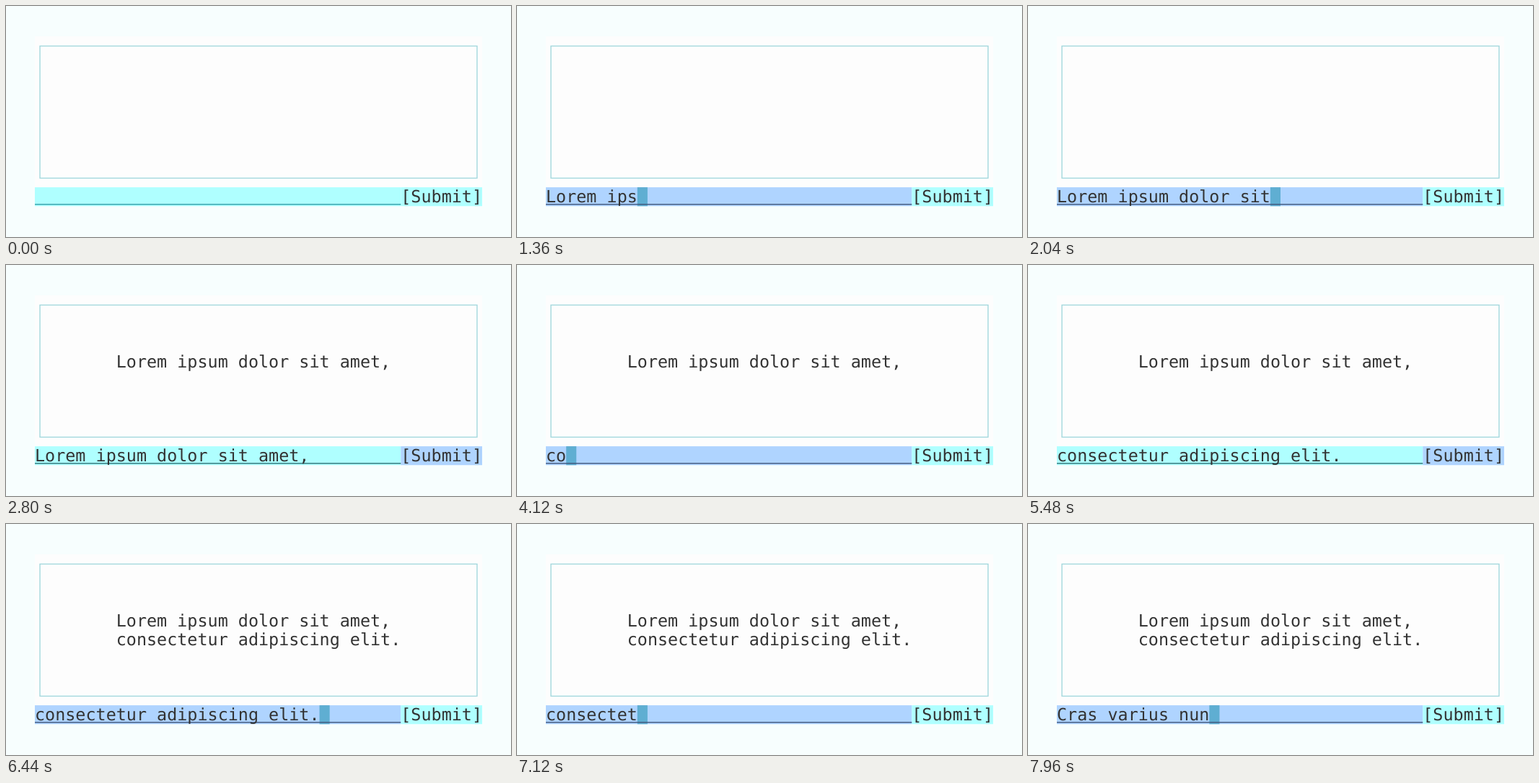
These frames come from a looping animation (700x320 px, 8000 ms). An HTML page:

```html
<!DOCTYPE html>
<html lang="en">
<head>
<meta charset="utf-8">
<title>Terminal form</title>
<style>
html, body { margin: 0; width: 100%; height: 100%; overflow: hidden; background: #f7fefe; }
svg { display: block; width: 700px; height: 320px; }
text {
  font: 23.405px "DejaVu Sans Mono", monospace;
  fill: #333;
  text-rendering: geometricPrecision;
  white-space: pre;
}
</style>
</head>
<body>
<svg id="stage" viewBox="0 0 700 320"></svg>
<script>
const LOOP = 8000, TICK = 40;
const COLS = 44, FIELD = 36, CELL_W = 620 / COLS, CELL_H = 26.14;
const IDLE = '#afffff', FOCUS = '#afd4ff', CURSOR = '#5faed2';
const INPUT_ROW = 8;

const stage = document.getElementById('stage');
const colX = c => 40 + c * CELL_W;
const rowY = r => 42 + r * CELL_H;

function add(tag, attrs) {
  const el = document.createElementNS('http://www.w3.org/2000/svg', tag);
  for (const k in attrs) el.setAttribute(k, attrs[k]);
  return stage.appendChild(el);
}

function cells(col, row, w, h, fill) {
  return add('rect', { x: colX(col), y: rowY(row), width: w * CELL_W, height: h * CELL_H, fill });
}

// One x per character keeps the text on the terminal grid.
function line(col, row, str) {
  const x = Array.from({ length: COLS - col }, (_, i) => colX(col + i).toFixed(2)).join(' ');
  const el = add('text', { x, y: rowY(row) + 21.2 });
  el.textContent = str;
  return el;
}

cells(0, 0, COLS, 9, '#fdfdfd');
add('rect', {
  x: colX(0.5), y: rowY(0.5) + 0.4, width: 43 * CELL_W, height: 7 * CELL_H,
  fill: 'none', stroke: '#a3d8dd', 'stroke-width': 1.4
});
const field = cells(0, INPUT_ROW, FIELD, 1);
const button = cells(FIELD, INPUT_ROW, COLS - FIELD, 1);
const cursor = cells(0, INPUT_ROW, 1, 1, CURSOR);
const rule = add('rect', { x: 40, y: 274.1, width: FIELD * CELL_W, height: 1.4 });
const typed = line(0, INPUT_ROW, '');
line(FIELD, INPUT_ROW, '[Submit]');

const texts = ['Lorem ipsum dolor sit amet,', 'consectetur adipiscing elit.', 'Cras varius nun'];
const output = [
  { at: 2800, el: line(8, 3, texts[0]) },
  { at: 5960, el: line(8, 4, texts[1]) }
];

// Characters erased, then typed, in each tick.
const runs = [
  { at: 1000, erase: '', type: '1111011111' + '0' + '1101201101' + '0' + '11011210111' },
  { at: 3760, erase: '33333433', type: '110' + '111101111' + '0' + '11101111012110111011' + '01' },
  { at: 6920, erase: '33343333', type: '1' + '110111011011' + '110201' }
];

const focusSteps = [
  [0, ''], [1000, 'field'], [2320, 'button'], [3280, 'field'], [5480, 'button'], [6440, 'field']
];

const sum = (digits, n) => [...digits.slice(0, n)].reduce((s, d) => s + +d, 0);

function inputAt(t) {
  const i = runs.findLastIndex(r => t >= r.at);
  if (i < 0) return '';
  const { at, erase, type } = runs[i];
  const n = Math.floor((t - at) / TICK) + 1;
  if (n <= erase.length) {
    const old = texts[i - 1];
    return old.slice(0, old.length - sum(erase, n));
  }
  return texts[i].slice(0, sum(type, n - erase.length));
}

function draw(t) {
  const focus = focusSteps.findLast(s => t >= s[0])[1];
  const inField = focus === 'field';
  const str = inputAt(t);
  if (typed.textContent !== str) typed.textContent = str;
  field.setAttribute('fill', inField ? FOCUS : IDLE);
  button.setAttribute('fill', focus === 'button' ? FOCUS : IDLE);
  cursor.setAttribute('x', colX(str.length));
  cursor.setAttribute('visibility', inField ? 'visible' : 'hidden');
  rule.setAttribute('fill', inField ? '#41587c' : focus ? '#2f7478' : '#33a0aa');
  for (const { at, el } of output) el.setAttribute('visibility', t >= at ? 'visible' : 'hidden');
}

const start = performance.now();
function frame() {
  draw((performance.now() - start) % LOOP);
  requestAnimationFrame(frame);
}
frame();
</script>
</body>
</html>
```
